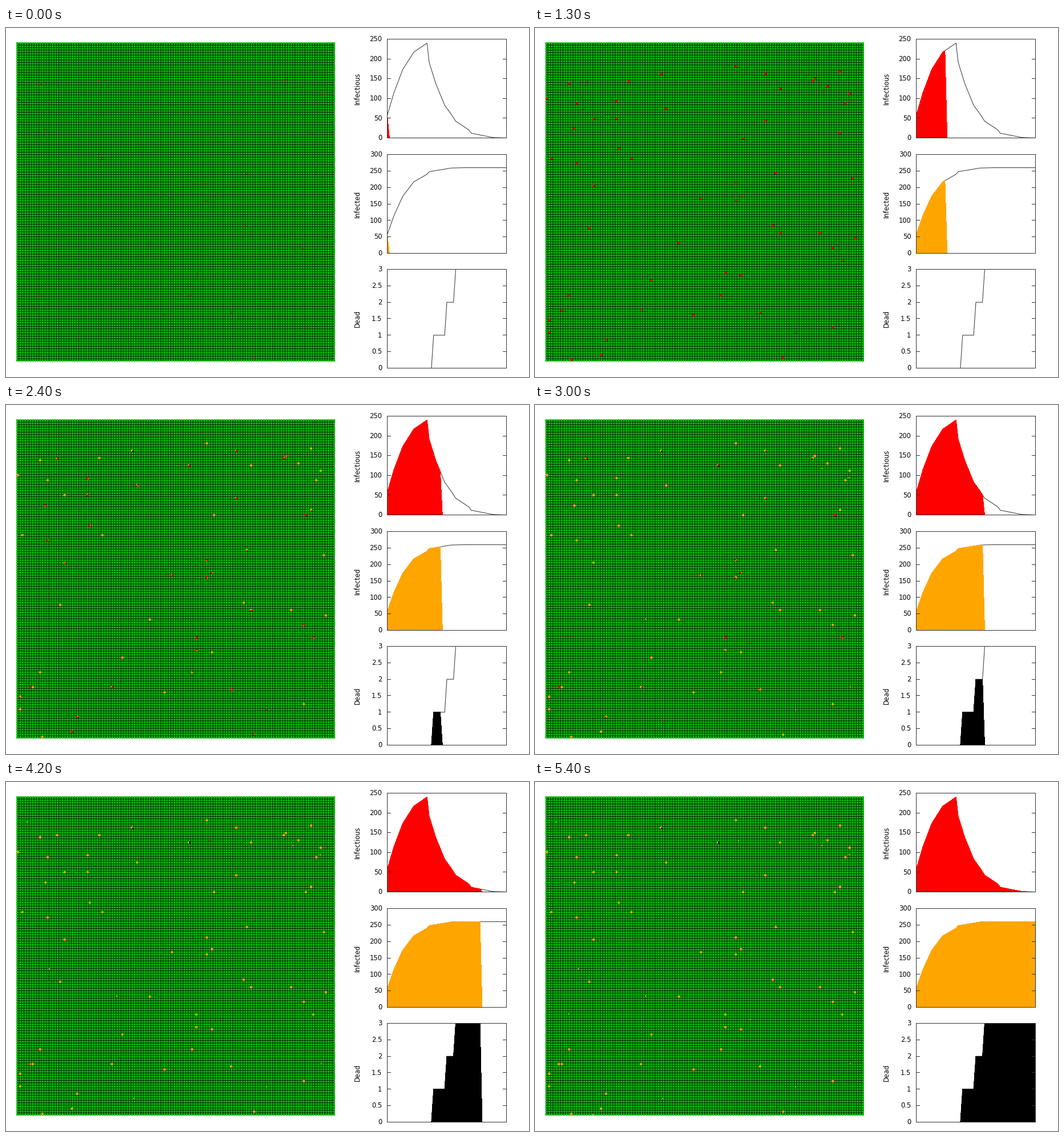
Write a matplotlib script that moves like this. It is 917x611 px and loops after 5500 ms.

```python
import random

import numpy as np
import matplotlib.pyplot as plt
from matplotlib.animation import FuncAnimation
from matplotlib.patches import Polygon, Rectangle

W, H, DPI = 917, 611, 64
PX = 72 / DPI                      # one pixel in points
STEPS, INTERVAL = 55, 100

GREEN, RED, ORANGE, BLACK = (0, 192, 0), (255, 0, 0), (255, 165, 0), (0, 0, 0)
INK = "#333333"

# Town map: square cells, one household each
CELLS, PITCH, GAP = 128, 4.358, 0.8
MAP_X, MAP_Y, MAP_SIZE = 18, 25, 559
MARGIN = (MAP_SIZE - CELLS * PITCH) / 2

FULL_HOUSES, SMALL_HOUSES, SEEDED = 62, 12, 57
ILL_DAYS = 18
DEATH_DAYS = (21, 27, 31)

# Total infections through a few key days; each case is counted for 19 days
days = np.arange(STEPS)
infected = np.interp(days, [0, 3, 7, 12, 18, 19, 29, 35],
                     [57, 114, 173, 217, 240, 248, 259, 260])
infectious = infected.copy()
infectious[ILL_DAYS + 1:] -= infected[:-ILL_DAYS - 1]
dead = sum((days >= d).astype(float) for d in DEATH_DAYS)


def make_map():
    """Green cells between soft dark gaps, with a notched rim."""
    pos = np.arange(MAP_SIZE) + 0.5 - MARGIN
    line = np.clip(np.rint(pos / PITCH), 1, CELLS - 1) * PITCH
    cover = 1 - np.clip((GAP + 1) / 2 - abs(pos - line), 0, min(GAP, 1))
    shade = np.outer(cover, cover)[..., None]
    panel = shade * GREEN
    rim = np.ones((MAP_SIZE, MAP_SIZE, 1), bool)
    rim[1:-1, 1:-1] = False
    panel = np.where(rim, panel + (1 - shade) * 255, panel)
    img = np.full((H, W, 3), 255, np.uint8)
    img[MAP_Y:MAP_Y + MAP_SIZE, MAP_X:MAP_X + MAP_SIZE] = panel.round()
    return img


def make_people():
    """People who fall ill: x, y, infection day, day of death."""
    rng = random.Random(7)
    queue = []
    homes = rng.sample(range(CELLS ** 2), FULL_HOUSES + SMALL_HOUSES)
    for i, home in enumerate(homes):
        row, col = divmod(home, CELLS)
        x = round(MAP_X + MARGIN + col * PITCH)
        y = round(MAP_Y + MARGIN + row * PITCH)
        seats = [(0, 0), (2, 0), (0, 2), (2, 2)]
        rng.shuffle(seats)
        delay = rng.random() + (0 if i < SEEDED else 0.5)
        size = 4 if i < FULL_HOUSES else 1
        for j, (dx, dy) in enumerate(seats[:size]):
            first = i < SEEDED and j == 0
            rank = 0 if first else 0.01 + delay + 0.3 * rng.random()
            queue.append((rank, x + dx, y + dy))
    queue.sort()

    # the infection curve sets the day each person in the queue falls ill
    people = [[x, y, int(np.searchsorted(infected, k + 0.5)), STEPS]
              for k, (_, x, y) in enumerate(queue)]
    for day in DEATH_DAYS:
        ill = [p for p in people if p[2] < day < p[2] + ILL_DAYS]
        rng.choice(ill)[3] = day
    return people


base_map = make_map()
people = make_people()


def map_at(step):
    img = base_map.copy()
    for x, y, start, death in people:
        if step < start:
            continue
        if step >= death:
            color = BLACK
        else:
            color = RED if step < start + ILL_DAYS else ORANGE
        img[y:y + 2, x:x + 2] = color
    return img


plt.rcParams["font.family"] = "DejaVu Sans"
fig = plt.figure(figsize=(W / DPI, H / DPI), dpi=DPI, facecolor="white")
ax = fig.add_axes([0, 0, 1, 1])
ax.axis("off")
town = ax.imshow(base_map, interpolation="nearest", aspect="auto", zorder=0)
ax.set_xlim(-0.5, W - 0.5)
ax.set_ylim(H - 0.5, -0.5)

LEFT, RIGHT, PLOT_H, TICK = 668, 877, 173, 6
FONT = 11.5 * PX


class Chart:
    def __init__(self, top, label, values, vmax, tick, color):
        self.bottom = top + PLOT_H
        self.xs = LEFT + days * (RIGHT - LEFT) / (STEPS - 1)
        self.ys = self.bottom - values * PLOT_H / vmax
        pen = dict(color=INK, lw=PX, snap=False)
        ax.plot(self.xs, self.ys, zorder=1, **pen)
        self.fill = Polygon([(LEFT, self.bottom)] * 3, fc=color, lw=0,
                            antialiased=False, zorder=2)
        ax.add_patch(self.fill)
        area = (LEFT, top), RIGHT - LEFT, PLOT_H
        self.fill.set_clip_path(Rectangle(*area, transform=ax.transData))
        ax.add_patch(Rectangle(*area, fill=False, zorder=3, **pen))
        for i in range(round(vmax / tick) + 1):
            y = self.bottom - i * tick * PLOT_H / vmax
            for x in (LEFT, RIGHT - TICK):
                ax.plot([x, x + TICK], [round(y)] * 2, zorder=3, **pen)
            ax.text(659, y + 3.8, f"{i * tick:g}", ha="right", va="baseline",
                    fontsize=FONT)
        ax.text(616, top + PLOT_H / 2, label, rotation=90, ha="center",
                va="center", fontsize=FONT)

    def show(self, step):
        xs, ys = self.xs[:step + 1], self.ys[:step + 1]
        drop = xs[-1] + self.xs[1] - self.xs[0]
        self.fill.set_xy([(LEFT, self.bottom), *zip(xs, ys),
                          (drop, self.bottom)])


charts = [
    Chart(19, "Infectious", infectious, 250, 50, "#ff0000"),
    Chart(221, "Infected", infected, 300, 50, "#ffa500"),
    Chart(422, "Dead", dead, 3, 0.5, "#000000"),
]


def draw(step):
    town.set_data(map_at(step))
    for chart in charts:
        chart.show(step)
    return [town] + [c.fill for c in charts]


anim = FuncAnimation(fig, draw, frames=STEPS, interval=INTERVAL, repeat=True,
                     repeat_delay=0, blit=False)
plt.show()
```
